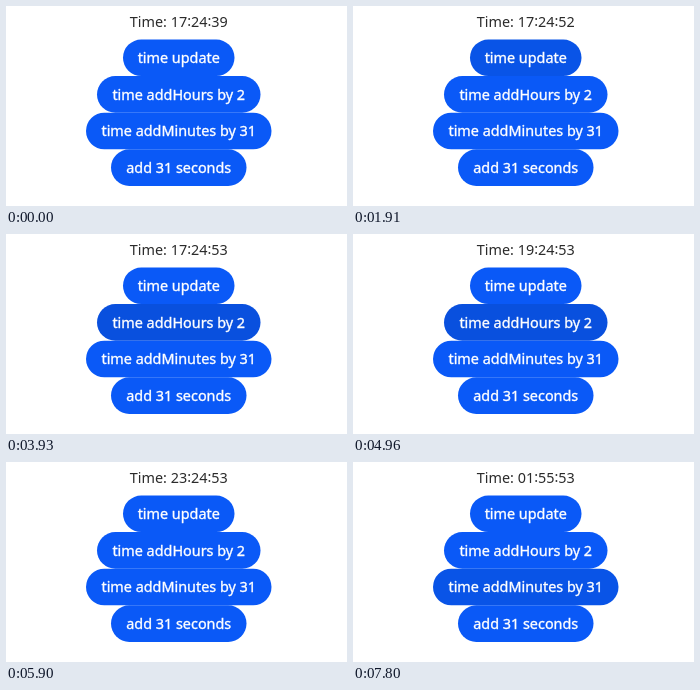
An HTML page that plays this animation: 341x200 px, repeating every 8 s.

```html
<!DOCTYPE html>
<html lang="en">
<head>
<meta charset="utf-8">
<style>
  html, body { margin: 0; width: 100%; height: 100%; overflow: hidden; background: #fff; }
  svg { display: block; width: 100%; height: 100%; }
  text { font: 14.4px "Noto Sans", "Open Sans", sans-serif; text-anchor: middle; fill: #2b2b2b; }
  g text { font-weight: 500; fill: #fff; stroke: #fff; stroke-width: .35px; }
</style>
</head>
<body>
<svg viewBox="0 0 341 200">
  <text id="clock" x="172.8" y="21"></text>
  <g id="buttons"></g>
</svg>
<script>
const LOOP = 8000, MID = 172.75, HEIGHT = 36.6;
const IDLE = '#0a59f7', SOFT = '#0954e7', DOWN = '#0950de';
const clock = document.getElementById('clock');
const group = document.getElementById('buttons');

function add(tag, attrs, text = '') {
  const el = document.createElementNS('http://www.w3.org/2000/svg', tag);
  for (const k in attrs) el.setAttribute(k, attrs[k]);
  el.textContent = text;
  return group.appendChild(el);
}

const buttons = [
  ['time update', 111.5],
  ['time addHours by 2', 163.5],
  ['time addMinutes by 31', 185.5],
  ['add 31 seconds', 135.5]
].map(([label, width], i) => {
  const y = 33.5 + i * HEIGHT;
  const pill = add('rect', { x: MID - width / 2, y, width, height: HEIGHT, rx: HEIGHT / 2 });
  add('text', { x: MID, y: y + 23.6 }, label);
  return pill;
});

// start ms, time shown, pressed button, its colour
const steps = [
  [0, '17:24:39'],
  [500, '17:24:51', 0, SOFT], [540, '17:24:51'],
  [1910, '17:24:52', 0, SOFT], [1950, '17:24:52'],
  [2690, '17:24:53', 0, SOFT], [2730, '17:24:53'],
  [3930, '17:24:53', 1, DOWN], [3970, '19:24:53'],
  [4960, '19:24:53', 1, DOWN], [5000, '21:24:53', 1, SOFT], [5040, '21:24:53'],
  [5820, '21:24:53', 1, DOWN], [5860, '23:24:53', 1, SOFT], [5900, '23:24:53'],
  [6810, '23:24:53', 1, DOWN], [6850, '01:24:53'],
  [7720, '01:24:53', 2, DOWN], [7800, '01:55:53', 2, SOFT]
];

// colons between digits sit a little higher
const raised = time => time.replace(/:(\d)/g, '<tspan dy="-1.3">:</tspan><tspan dy="1.3">$1</tspan>');

let shown;
function draw(now) {
  const t = now % LOOP;
  const step = steps.findLast(s => s[0] <= t);
  if (step !== shown) {
    const [, time, pressed, colour] = shown = step;
    clock.innerHTML = 'Time: ' + raised(time);
    buttons.forEach((b, i) => b.setAttribute('fill', i === pressed ? colour : IDLE));
  }
  requestAnimationFrame(() => draw(performance.now()));
}
draw(performance.now());
</script>
</body>
</html>
```
